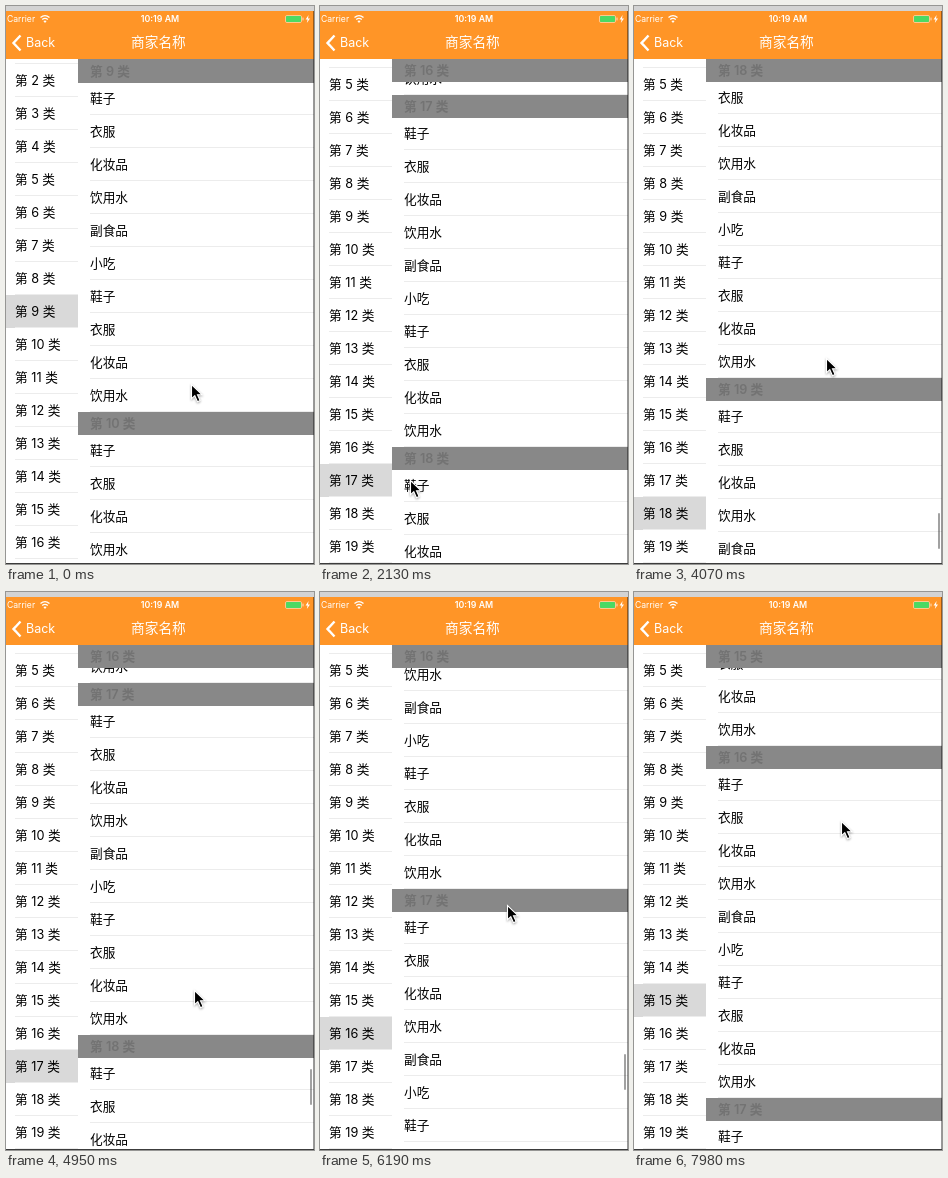
Animation of 308 by 558 pixels, one loop 8 s. Source, as an HTML page:

```html
<!DOCTYPE html>
<html lang="zh-CN">
<head>
<meta charset="utf-8">
<title>Linked lists</title>
<style>
html, body { margin: 0; width: 100%; height: 100%; overflow: hidden; background: #fff; }
#stage { position: absolute; left: 0; top: 0; width: 308px; height: 558px; overflow: hidden; background: #fff;
  font: 12.7px/33px Inter, "Noto Sans CJK SC", sans-serif; color: #000; white-space: nowrap; }
#stage div, #stage svg, #stage span { position: absolute; }
#menu, #goods { left: 0; width: 72px; height: 0; }
#goods { left: 72px; width: 236px; }
.row { left: 0; width: 100%; height: 33px; box-sizing: border-box; padding-left: 12px; }
.row::after { content: ""; position: absolute; left: 12px; right: 0; bottom: 0; height: 1px; background: #ececec; }
#menu .row { padding-left: 9px; }
#menu .row::after { left: 9px; }
.head { left: 72px; width: 236px; height: 23px; box-sizing: border-box; padding-left: 12px;
  background: #888; color: #737373; font-weight: 600; line-height: 23px; }
#bar { left: 304px; width: 2px; height: 36px; border-radius: 1px; background: #000; }
#nav { left: 0; top: 5px; width: 308px; height: 48px; background: #ff9527; color: #fff; }
#nav span { line-height: 16px; }
#edge { left: 0; top: 0; width: 308px; height: 5px; background: #d3d3d3; }
#side { left: 307px; top: 5px; width: 1px; height: 553px; background: rgba(0,0,0,.4); }
#foot { left: 0; top: 557px; width: 308px; height: 1px; background: #3c3c3c; }
#cursor { filter: drop-shadow(0 1px 1px rgba(0,0,0,.35)); }
</style>
</head>
<body>
<div id="stage">
  <div id="menu"></div>
  <div id="goods"></div>
  <div id="heads"></div>
  <div id="bar"></div>
  <div id="nav">
    <span style="left:1px;top:0;font-size:8.6px">Carrier</span>
    <span style="left:154px;top:0;transform:translateX(-50%);font-size:8.8px;font-weight:600">10:19 AM</span>
    <span style="left:20px;top:24px;font-size:12.5px">Back</span>
    <span style="left:125px;top:23px;font-size:13.7px">商家名称</span>
    <svg width="308" height="48" fill="none" stroke="#fff">
      <path d="M34.5 6.6Q39 2.6 43.5 6.6M36.2 8.6Q39 6.2 41.8 8.6" stroke-width="1.3"/>
      <path d="M37.4 10Q39 8.8 40.6 10L39 11.9Z" fill="#fff" stroke="none"/>
      <path d="M14.5 24.5L7.5 32L14.5 39.5" stroke-width="2.4"/>
      <rect x="279.5" y="4.5" width="16" height="7" rx="1.5" stroke-width=".8" stroke-opacity=".6"/>
      <rect x="280" y="5" width="15" height="6" rx="1" fill="#4cd964" stroke="none"/>
      <path d="M297 6.6V9.4" stroke-opacity=".7"/>
      <path d="M302.6 4L299.6 8.6H301.6L300.8 12L304 7.4H302Z" fill="#fff" stroke="none"/>
    </svg>
  </div>
  <div id="edge"></div><div id="side"></div><div id="foot"></div>
  <svg id="cursor" width="16" height="21" viewBox="-1.5 -1.5 16 21">
    <path d="M0 0V14.2L3.3 11.2L6 17.2L8.6 16L6 10.2H10.5Z" fill="#000" stroke="#fff" stroke-width="1.1"/>
  </svg>
</div>
<script>
const LOOP = 8000, ROW = 33, HEAD = 22, SECTION = 352, COUNT = 20, TOP = 53;
const NAMES = '鞋子 衣服 化妆品 饮用水 副食品 小吃 鞋子 衣服 化妆品 饮用水'.split(' ');

const smooth = p => p * p * (3 - 2 * p);
const easeOut = p => 1 - (1 - p) ** 2;

// Runs a value through moves of { a, b: start and end tick, to, ease }.
function follow(from, moves, k) {
  let v = from;
  for (const { a, b, to, ease = smooth } of moves) {
    if (k <= a) break;
    v += (to - v) * ease(Math.min(1, (k - a) / (b - a)));
  }
  return v;
}

const section = n => n * SECTION - TOP - 1;
const tap = (a, to) => ({ a, b: a + 1.54, to });
const FIRST_TAP = 4.669, DRAG = 15;

const SCROLL = [
  tap(FIRST_TAP, section(15)),
  tap(FIRST_TAP + 6, section(17)),
  { a: 14, b: 17, to: 6315 },
  { a: 17, b: 20, to: 6480, ease: easeOut },
  { a: 20, b: 23, to: 6316 },
  { a: 23, b: 32, to: 5789, ease: easeOut },
  { a: 32.4, b: 39.2, to: 5477.5 }
];
const MENU = [tap(FIRST_TAP, -86.5)];
const POINTER = [
  { a: 0, b: 5, x: 37, y: 481 },
  { a: 11, b: 14, x: 244, y: 455 },
  { a: 14, b: 17, x: 238.5, y: 232 },
  { a: 17, b: 20, x: 212, y: 170 },
  { a: 20, b: 23, x: 192.5, y: 352 },
  { a: 23, b: 26, x: 190, y: 480 },
  { a: 26, b: 32, x: 183.5, y: 164 },
  { a: 32, b: 38, x: 190.5, y: 463 },
  { a: 41, b: 42, x: 191, y: 418 },
  { a: 44, b: 45, x: 207.5, y: 229.5 }
];
const axis = key => POINTER.map(m => ({ a: m.a, b: m.b, to: m[key] }));
const POINTER_X = axis('x'), POINTER_Y = axis('y');

const scrollAt = k => Math.round(follow(section(9), SCROLL, k));
const topSection = k => Math.floor((scrollAt(k) + TOP + 2) / SECTION);
// Taps select at once; while dragging the selection trails by a tick.
const selected = k => k < 5 ? 9 : k < 11 ? 15 : k < DRAG ? 17 : topSection(k - 1);

const $ = id => document.getElementById(id);
function add(parent, cls, top, text) {
  const el = document.createElement('div');
  el.className = cls;
  el.style.top = top + 'px';
  el.textContent = text;
  return parent.appendChild(el);
}

const items = [], heads = [];
for (let n = 0; n < COUNT; n++) {
  const label = `第 ${n} 类`;
  items.push(add($('menu'), 'row', (n - .5) * ROW, label));
  heads.push(add($('heads'), 'head', 0, label));
  NAMES.forEach((name, i) => add($('goods'), 'row', n * SECTION + HEAD + i * ROW, name));
}

function draw(k) {
  const offset = scrollAt(k);
  $('menu').style.top = follow(8, MENU, k) + 'px';
  $('goods').style.top = -offset + 'px';
  heads.forEach((el, n) => {
    const own = n * SECTION - offset;
    el.style.top = Math.min(Math.max(own, TOP), own + SECTION - HEAD) + 'px';
  });

  // A selection made by dragging cross-fades for one tick.
  const now = selected(k), before = selected(k - 1);
  const fading = k > DRAG && now !== before;
  items.forEach((el, n) => {
    const a = n === now ? (fading ? .75 : 1) : fading && n === before ? .4 : 0;
    el.style.background = `rgba(0,0,0,${a * .15})`;
  });

  const bar = $('bar').style;
  bar.top = 51.5 + (offset + TOP) / (COUNT * SECTION) * 504 + 'px';
  bar.opacity = k < DRAG || k > 42 ? 0 : k === 42 ? .15 : .37;

  const cur = $('cursor').style;
  cur.left = follow(185.5, POINTER_X, k) - 1.5 + 'px';
  cur.top = follow(378, POINTER_Y, k) - 1.5 + 'px';
  cur.visibility = k === 43 || k === 44 ? 'hidden' : 'visible';
}

// Ticks run slightly slower near the end.
const tickAt = t => Math.floor((t < 6190 ? t / 176.86 : 35 + (t - 6190) / 179) + .03);
const start = performance.now();
let last = -1;
function frame() {
  const k = tickAt((performance.now() - start) % LOOP);
  if (k !== last) draw(last = k);
  requestAnimationFrame(frame);
}
frame();
</script>
</body>
</html>
```
